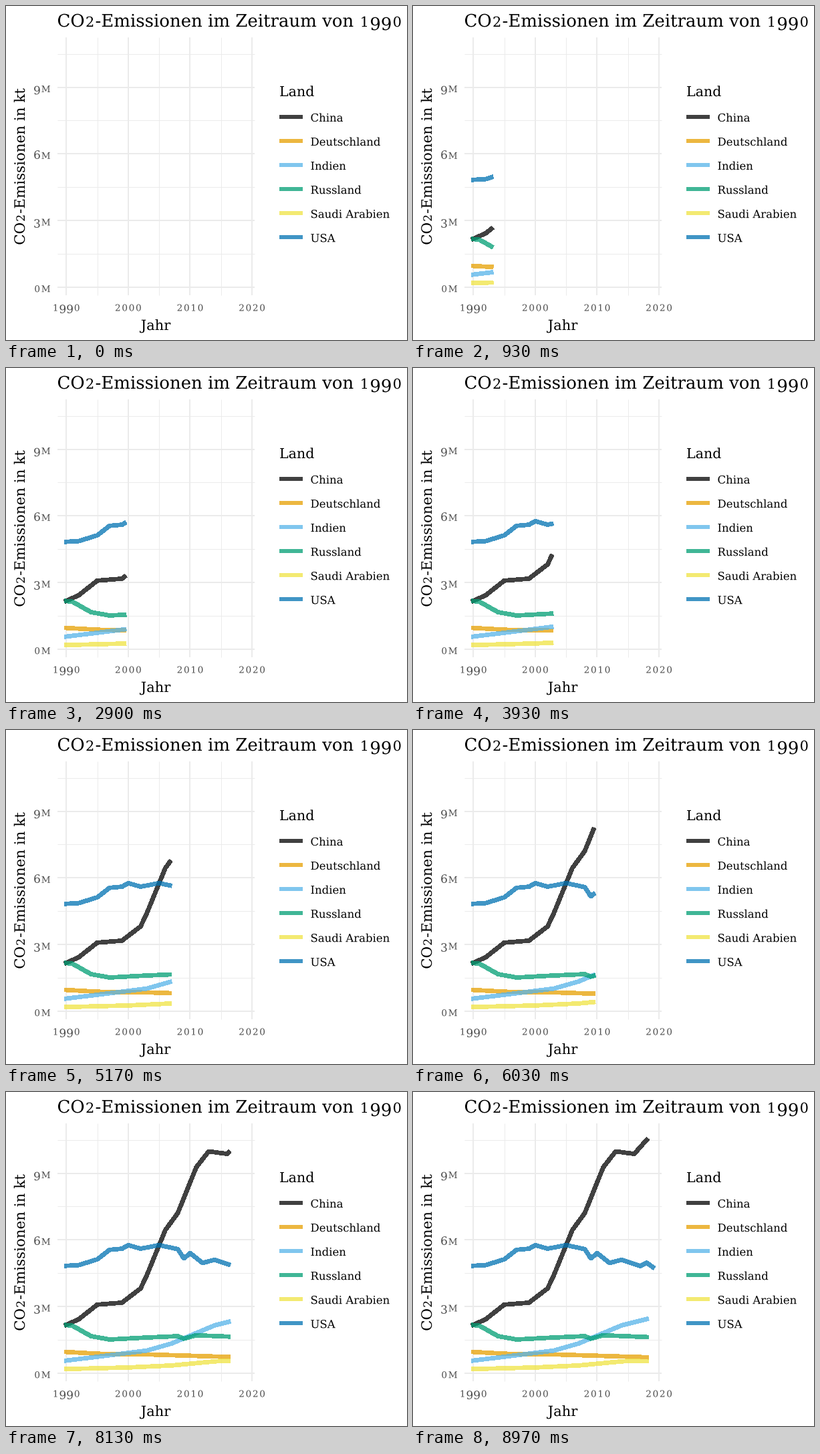
Animation of 600 by 500 pixels, one loop 10000 ms. Source, as a matplotlib script:

```python
import matplotlib.pyplot as plt
import numpy as np
from matplotlib.animation import FuncAnimation
from matplotlib.patches import PathPatch
from matplotlib.path import Path
from matplotlib.textpath import TextPath
from matplotlib.transforms import Affine2D

W, H, DPI = 600, 500, 100
PX = 72 / DPI
FRAMES, LAST = 300, 269
START, SPAN = 1990, 29
LINE = 5.7 * PX
GRID, TICK = "#ebebeb", "#4d4d4d"
plt.rcParams["font.family"] = "DejaVu Serif"

# name, colour, turning points as (years since START, million kt)
SERIES = [
    ("China", "#000000", [
        (0, 2.17), (2, 2.42), (5, 3.08), (9, 3.17), (12, 3.81), (13, 4.4),
        (16, 6.44), (18, 7.2), (21, 9.27), (23, 9.98), (26, 9.87),
        (28, 10.5)]),
    ("Deutschland", "#E69F00", [
        (0, 0.95), (5, 0.87), (14, 0.83), (28, 0.71)]),
    ("Indien", "#56B4E9", [
        (0, 0.56), (13, 1.01), (17, 1.33), (24, 2.15), (28, 2.43)]),
    ("Russland", "#009E73", [
        (0, 2.16), (1, 2.13), (4, 1.66), (7, 1.51), (13, 1.6), (18, 1.66),
        (19, 1.55), (21, 1.7), (28, 1.62)]),
    ("Saudi Arabien", "#F0E442", [
        (0, 0.18), (10, 0.25), (17, 0.34), (25, 0.55), (28, 0.53)]),
    ("USA", "#0072B2", [
        (0, 4.83), (2, 4.86), (5, 5.12), (7, 5.55), (9, 5.6), (10, 5.76),
        (12, 5.6), (15, 5.76), (18, 5.58), (19, 5.16), (20, 5.4), (22, 4.96),
        (24, 5.1), (27, 4.82), (28, 4.97), (29, 4.77)]),
]


def px_x(year):
    return 90.22 + (year - START) * 9.262


def px_y(value):
    return 420.7 - value * 33.24


fig = plt.figure(figsize=(W / DPI, H / DPI), dpi=DPI, facecolor="white")
ax = fig.add_axes([0, 0, 1, 1])
ax.set(xlim=(0, W), ylim=(H, 0))
ax.axis("off")


def glyph_style(ch):
    """Scale, drop and extra space (in em) that give old-style figures."""
    if ch in "012M":
        return 0.8, 0.0, 0.1
    if ch in "34579":
        return 1.0, 0.19, 0.0
    return 1.0, 0.0, 0.0


def advance(ch, size):
    full = TextPath((0, 0), f"|{ch}|", size=size).get_extents().width
    return full - TextPath((0, 0), "||", size=size).get_extents().width


def write(x, y, s, size, align=0.0, color="black", angle=0):
    """Draw s with its baseline at y; align 0, 0.5 or 1 along the line."""
    pen, parts = 0.0, []
    for ch in s:
        scale, drop, space = glyph_style(ch)
        if ch != " ":
            glyph = TextPath((0, 0), ch, size=size * scale)
            move = Affine2D().translate(pen + space * size / 2, -drop * size)
            parts.append(move.transform_path(glyph))
        pen += advance(ch, size * scale) + space * size
    place = (Affine2D().translate(-align * pen, 0).scale(1, -1)
             .rotate_deg(-angle).translate(x, y))
    path = place.transform_path(Path.make_compound_path(*parts))
    ax.add_patch(PathPatch(path, facecolor=color, linewidth=0))


def grid_line(xs, ys, width):
    ax.plot(xs, ys, color=GRID, lw=width * PX, solid_capstyle="butt", zorder=0)


def draw_grid():
    left, right, top, bottom = 77, 372, 47, 433
    for year in range(1995, 2020, 10):
        grid_line([px_x(year)] * 2, [top, bottom], 1)
    for value in np.arange(1.5, 11, 3):
        grid_line([left, right], [px_y(value)] * 2, 1)
    for year in range(1990, 2021, 10):
        grid_line([px_x(year)] * 2, [top, bottom], 2)
        write(px_x(year), 456.5, str(year), 17, 0.5, TICK)
    for value in range(0, 10, 3):
        grid_line([left, right], [px_y(value)] * 2, 2)
        write(67.5, px_y(value) + 7.5, f"{value}M", 17, 1, TICK)


def stroke(xs, ys, color):
    return ax.plot(xs, ys, color=color, alpha=0.75, lw=LINE, zorder=2,
                   antialiased=False, solid_capstyle="projecting",
                   solid_joinstyle="round")[0]


draw_grid()
write(76.5, 31, "CO2-Emissionen im Zeitraum von 1990", 26)
write(224, 485, "Jahr", 21, 0.5)
write(28, 240.5, "CO2-Emissionen in kt", 21.4, 0.5, angle=90)
write(409, 135, "Land", 20.6)

curves = []
for row, (name, color, points) in enumerate(SERIES):
    y = 166 + 36.05 * row
    stroke([412, 441], [y, y], color)
    write(455.5, y + 7, name, 16.5)
    years, values = np.array(points).T
    curves.append((stroke([], [], color), START + years, values))


def update(i):
    now = START + SPAN * min(i, LAST) / LAST
    for line, years, values in curves:
        if i == 0:
            line.set_data([], [])
            continue
        head = min(now, years[-1])
        xs = np.append(years[years < head], head)
        line.set_data(px_x(xs), px_y(np.interp(xs, years, values)))
    return [line for line, _, _ in curves]


anim = FuncAnimation(fig, update, frames=FRAMES, interval=10000 / FRAMES,
                     init_func=lambda: update(0), repeat=True, repeat_delay=0)
plt.show()
```
